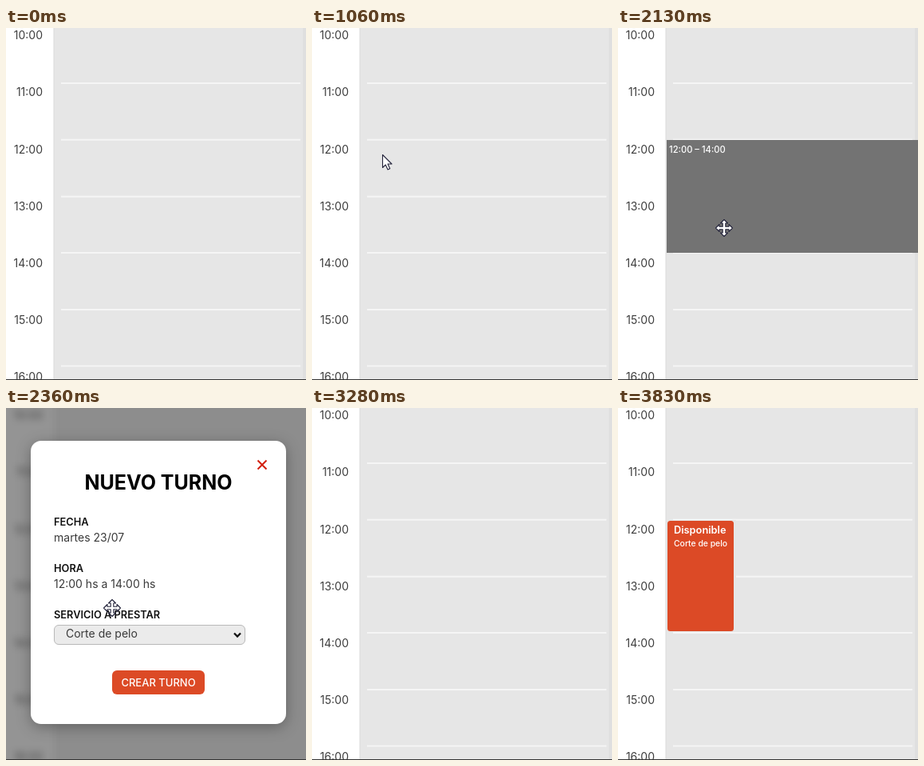
An HTML page for the animation above (4.46 s loop, 376 by 440 pixels).

```html
<!DOCTYPE html>
<html lang="es">
<head>
<meta charset="utf-8">
<title>Nuevo turno</title>
<style>
  html, body { margin: 0; width: 100%; height: 100%; overflow: hidden; background: #fff; }
  svg { display: block; width: 376px; height: 440px; font-family: Inter, "Open Sans", sans-serif; }

  .hours text { font-size: 14px; fill: #3f3f3f; text-anchor: end; }
  .lines { stroke: #f5f5f5; stroke-width: 2; }
  .range { font-size: 11.2px; font-weight: 500; fill: #fff; }
  .event text { fill: #fff; }
  .event .title { font-size: 12.8px; font-weight: 600; }
  .event .service { font-size: 10.4px; font-weight: 500; }

  .blurred { filter: blur(5px); }
  .card { fill: #fff; filter: drop-shadow(0 4px 9px rgba(0, 0, 0, .3)); }
  .heading { font-size: 25px; font-weight: 700; text-anchor: middle; }
  .label { font-size: 12.8px; font-weight: 600; fill: #111; }
  .value { font-size: 14px; fill: #3a3a3a; }
  .button text { font-size: 13px; font-weight: 500; text-anchor: middle; }

  .cursor path { fill: #fff; stroke: #23233a; stroke-width: 1.1; stroke-linejoin: round; }

  /* Every part runs on the same 4460 ms clock. */
  .timed { animation: 4460ms step-end infinite; opacity: 0; }
  .first { animation-name: first; }
  .second { animation-name: second; }
  .modal { animation-name: modal; }
  .hover { animation-name: hover; }
  .event { animation-name: event; }
  .arrow { animation-name: arrow; }
  .move { animation-name: move; }
  .hand { animation-name: hand; }
  .cursor { animation: travel 4460ms infinite; }

  @keyframes first { 0% { opacity: 0 } 28.03% { opacity: 1 } 38.34%, 100% { opacity: 0 } }
  @keyframes second { 0% { opacity: 0 } 38.34% { opacity: 1 } 52.91%, 100% { opacity: 0 } }
  @keyframes modal { 0% { opacity: 0 } 52.91% { opacity: 1 } 73.54%, 100% { opacity: 0 } }
  @keyframes hover { 0% { opacity: 0 } 65.7% { opacity: 1 } 73.54%, 100% { opacity: 0 } }
  @keyframes event { 0% { opacity: 0 } 83.86%, 100% { opacity: 1 } }
  @keyframes arrow {
    0% { opacity: 0 } 15.25% { opacity: 1 } 28.03% { opacity: 0 }
    58.5% { opacity: 1 } 65.7%, 100% { opacity: 0 }
  }
  @keyframes move { 0% { opacity: 0 } 28.03% { opacity: 1 } 58.5%, 100% { opacity: 0 } }
  @keyframes hand { 0% { opacity: 0 } 65.7% { opacity: 1 } 73.54%, 100% { opacity: 0 } }
  @keyframes travel {
    0%, 15.25% { transform: translate(215px, 6px); animation-timing-function: steps(4) }
    23.77%, 26% { transform: translate(88px, 158px); animation-timing-function: steps(5) }
    36.77% { transform: translate(113px, 212px); animation-timing-function: steps(1) }
    38.34% { transform: translate(117px, 221px); animation-timing-function: steps(4) }
    47.75%, 56.39% { transform: translate(133px, 250px); animation-timing-function: steps(6) }
    69.05%, 100% { transform: translate(181px, 345px) }
  }
</style>
</head>
<body>
<svg viewBox="0 0 376 440">
  <rect width="376" height="440" fill="#fff"/>
  <rect x="60" width="316" height="440" fill="#e6e6e6"/>
  <path d="M60 0V440" stroke="#d9d9d9"/>
  <path d="M374 0V440" stroke="#dfdfdf" stroke-width="4"/>
  <path class="lines" d="M69 69H369M69 139.8H369M69 210.7H369M69 281H369M69 352H369M69 422.6H369"/>
  <g id="hours" class="hours">
    <text x="46" y="14">10:00</text>
    <text x="46" y="85">11:00</text>
    <text x="46" y="157">12:00</text>
    <text x="46" y="228">13:00</text>
    <text x="46" y="299">14:00</text>
    <text x="46" y="370">15:00</text>
    <text x="46" y="441">16:00</text>
  </g>

  <g class="timed first">
    <rect x="61" y="140" width="315" height="70" fill="#737373"/>
    <text class="range" x="64" y="155.5">12:00 – 13:00</text>
  </g>
  <g class="timed second">
    <rect x="61" y="140" width="315" height="141" fill="#737373"/>
    <text class="range" x="64" y="155.5">12:00 – 14:00</text>
  </g>

  <g class="timed event">
    <rect x="61" y="140" width="87" height="140" fill="#e6e6e6"/>
    <rect x="62" y="141" width="83" height="138" rx="3.5" fill="#dc4a26"/>
    <text class="title" x="70" y="157">Disponible</text>
    <text class="service" x="70" y="173">Corte de pelo</text>
  </g>

  <g class="timed modal">
    <rect width="376" height="440" fill="#8d8d8d"/>
    <g class="blurred">
      <rect x="-20" y="-20" width="80" height="480" fill="#949494"/>
      <use href="#hours"/>
    </g>
    <rect class="card" x="31" y="41" width="320" height="354" rx="13"/>
    <path d="M315.500 65.500l11 11m0-11l-11 11" stroke="#d3200f" stroke-width="2"/>
    <text class="heading" x="191" y="102">NUEVO TURNO</text>
    <text class="label" x="60" y="147">FECHA</text>
    <text class="value" x="60" y="166.500">martes 23/07</text>
    <text class="label" x="60" y="205">HORA</text>
    <text class="value" x="60" y="224.500">12:00 hs a 14:00 hs</text>
    <text class="label" x="60" y="262.500">SERVICIO A PRESTAR</text>
    <rect x="60.500" y="271.500" width="239" height="24" rx="5.500" fill="#ebebeb" stroke="#b9b9b9"/>
    <text class="value" x="75" y="287">Corte de pelo</text>
    <path d="M286 281.500l4 4 4-4" fill="none" stroke="#111" stroke-width="2.300"/>
    <g class="button">
      <rect x="133" y="328" width="116" height="30" rx="6" fill="#dc4a26"/>
      <text x="191" y="347.500" fill="#fff">CREAR TURNO</text>
      <g class="timed hover">
        <rect x="133.500" y="328.500" width="115" height="29" rx="5.500" fill="#f8d2c9" stroke="#d04a2b"/>
        <text x="191" y="347.500" fill="#dc5535">CREAR TURNO</text>
      </g>
    </g>
  </g>

  <g class="cursor">
    <path class="timed arrow" d="M.5.5V16.500L4.200 13 7 19 9.700 17.800 7 12H12Z"/>
    <path class="timed move" d="M0-10.500L4.500-6H1.800V-1.800H6V-4.500L10.500 0 6 4.500V1.800H1.800V6H4.500L0 10.500-4.500 6H-1.800V1.800H-6V4.500L-10.500 0-6-4.500V-1.800H-1.800V-6H-4.500Z"/>
    <g class="timed hand">
      <path d="M-1.500 14V1.500a1.800 1.800 0 0 1 3.600 0V8a1.700 1.700 0 0 1 3.300 0V9a1.600 1.600 0 0 1 3.100 0v1a1.500 1.500 0 0 1 2.800 0V16c0 3-1.800 4-1.800 7H0c0-3-2-4-4-7.500L-6.300 12c-1-2 1.300-3.200 2.800-1.200Z"/>
      <path d="M2.100 8v4M5.400 9v3M8.500 10v2"/>
    </g>
  </g>

  <rect y="439" width="376" height="1" fill="#333"/>
</svg>
</body>
</html>
```
